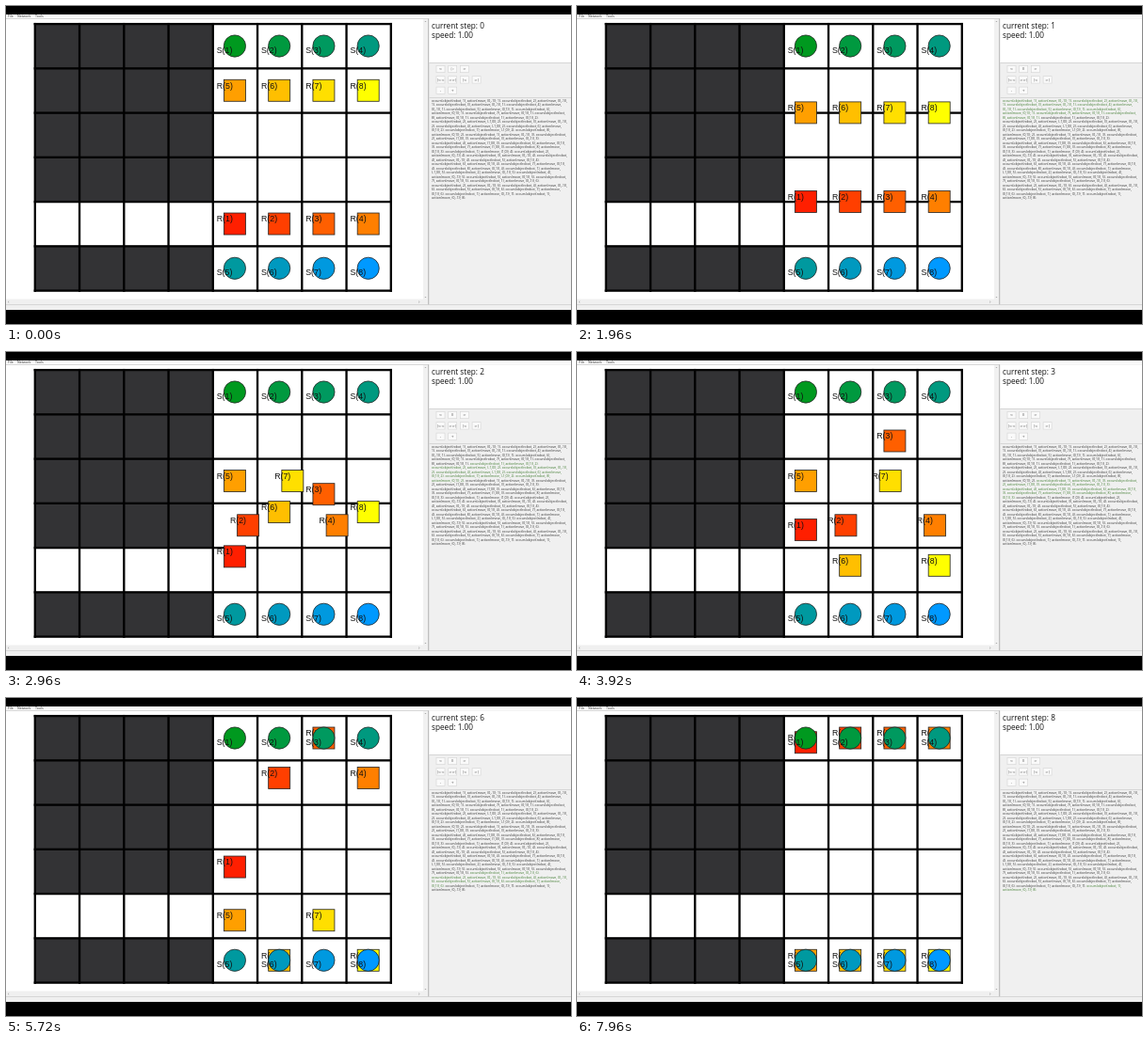
These frames come from a looping animation (600 by 338 pixels, 8 s). An HTML page with a canvas:

```html
<!DOCTYPE html>
<html lang="en">
<head>
<meta charset="utf-8">
<title>Grid robots</title>
<style>
  html, body { margin: 0; width: 100%; height: 100%; overflow: hidden; background: #000; }
  canvas { display: block; width: 600px; height: 338px; }
</style>
</head>
<body>
<canvas id="stage"></canvas>
<script>
const LOOP = 8000, PLAY_AT = 750, MOVE_AT = 1565, STEP_MS = 811, TICKS = 20;
const CELL = 47.25, LEFT = 30.8, TOP = 19.1, LINE = 2.3;
const UI = '"Open Sans", sans-serif';
const ZOOM = 10; // text is set large and scaled down, so small sizes keep exact advances
const DIRS = { U: [0, -1], D: [0, 1], L: [-1, 0], R: [1, 0], '.': [0, 0] };

// Start column and row, then one letter per step.
const robots = [
  [4, 4, 'UDURLUUU'], [5, 4, 'ULRUUU'], [6, 4, 'UUUU'], [7, 4, 'ULRUUU'],
  [4, 1, 'D..DDD'], [5, 1, 'DDDD'], [6, 1, 'DLRDDD'], [7, 1, 'DDDD']
].map(([col, row, moves], i) => ({ col, row, moves, id: i + 1 }));

const canvas = document.getElementById('stage');
const ctx = canvas.getContext('2d');
const ratio = window.devicePixelRatio || 1;
canvas.width = 600 * ratio;
canvas.height = 338 * ratio;
ctx.scale(ratio, ratio);

function rect(x, y, w, h, fill, stroke, line = 1) {
  ctx.fillStyle = fill;
  ctx.fillRect(x, y, w, h);
  if (stroke) {
    ctx.strokeStyle = stroke;
    ctx.lineWidth = line;
    ctx.strokeRect(x, y, w, h);
  }
}

function text(str, x, y, size, color = '#000', family = UI) {
  ctx.save();
  ctx.translate(x, y);
  ctx.scale(1 / ZOOM, 1 / ZOOM);
  ctx.font = `${size * ZOOM}px ${family}`;
  ctx.fillStyle = color;
  ctx.fillText(str, 0, 0);
  ctx.restore();
}

const label = (str, x, y) => text(str, x, y, 8.8, '#111', '"Liberation Sans", sans-serif');
const center = (col, row) => [LEFT + (col + 0.5) * CELL - 0.5, TOP + (row + 0.5) * CELL - 0.2];

// The plan as wrapped words, each tagged with its step.
function layoutPlan() {
  const size = 3.45, left = 452, right = 597.5, words = [];
  let x = left, y = 101.5;
  ctx.font = `${size * ZOOM}px ${UI}`;
  const measure = str => ctx.measureText(str).width / ZOOM;
  for (let step = 1; step <= 8; step++) {
    for (const { id, moves } of robots) {
      const move = moves[step - 1];
      if (!move || move === '.') continue;
      const fact = `occurs(object(robot, ${id}), action(move, (${DIRS[move]})), ${step}).`;
      for (const str of fact.split(' ')) {
        const width = measure(str);
        if (x + width > right) { x = left; y += 4.5; }
        words.push({ str, x, y, step, size });
        x += width + measure(' ');
      }
    }
  }
  return words;
}
const plan = layoutPlan();

function drawButtons(playing) {
  const rows = [['<', playing ? 'II' : '▷', '>'], ['|<<', '>>|', '|<', '>|'], ['-', '+']];
  ctx.textAlign = 'center';
  rows.forEach((row, r) => row.forEach((icon, c) => {
    const x = 461.5 + c * 12.7, y = 67 + r * 11.4;
    rect(x - 4.5, y - 3.7, 9, 7.4, '#fafafa', '#d4d4d4', 0.6);
    text(icon, x, y + 1.4, 4, '#666', '"DejaVu Sans", sans-serif');
  }));
  ctx.textAlign = 'left';
}

function drawWindow(step, playing) {
  rect(0, 0, 600, 338, '#000');
  rect(0, 9, 600, 314, '#f0f0f0');
  rect(0, 9, 600, 4.5, '#fafafa');
  [['File', 2], ['Network', 12], ['Tools', 31]].forEach(([s, x]) => text(s, x, 12, 3.6, '#333'));
  rect(0, 13.5, 449, 0.8, '#bbb');
  rect(0, 14, 443, 297.5, '#fff');
  rect(443, 14, 5, 297.5, '#f1f1f1');
  rect(448.3, 13.5, 0.9, 304, '#aaa');
  rect(0, 317, 600, 0.7, '#ccc');
  text('‹', 2, 316, 5, '#777');
  text('›', 438, 316, 5, '#777');
  text('ˆ', 444, 20, 5, '#777');
  text('ˇ', 444, 313, 5, '#777');

  rect(449.5, 14, 150.5, 46, '#fff');
  rect(449.5, 60, 150.5, 0.7, '#ccc');
  rect(449.5, 97, 150.5, 0.7, '#ccc');
  text(`current step: ${step}`, 452, 23.5, 8.25, '#111');
  text('speed: 1.00', 452, 34, 8.25, '#111');
  drawButtons(playing);
  for (const w of plan) text(w.str, w.x, w.y, w.size, w.step === step ? '#3c7a2c' : '#333');
}

function drawGrid() {
  for (let row = 0; row < 6; row++) {
    for (let col = 0; col < 8; col++) {
      const dark = col < 4 && row !== 4;
      rect(LEFT + col * CELL, TOP + row * CELL, CELL, CELL, dark ? '#333335' : '#fff');
    }
  }
  const half = LINE / 2;
  ctx.fillStyle = '#000';
  for (let c = 0; c <= 8; c++) ctx.fillRect(LEFT + c * CELL - half, TOP - half, LINE, 6 * CELL + LINE);
  for (let r = 0; r <= 6; r++) ctx.fillRect(LEFT - half, TOP + r * CELL - half, 8 * CELL + LINE, LINE);
}

function drawRobot({ col, row, moves, id }, progress) {
  [...moves].forEach((move, i) => {
    const part = Math.min(1, Math.max(0, progress - i));
    col += DIRS[move][0] * part;
    row += DIRS[move][1] * part;
  });
  const [x, y] = center(col, row);
  rect(x - 11.5, y - 11.5, 23, 23, `rgb(255, ${32 * id - 1}, 0)`, '#222', 0.8);
  label(`R(${id})`, x - 19.2, y - 2.2);
}

function drawStation(id) {
  const [x, y] = center(4 + (id - 1) % 4, id > 4 ? 5 : 0);
  ctx.beginPath();
  ctx.arc(x, y, 11.6, 0, Math.PI * 2);
  ctx.fillStyle = `rgb(0, 153, ${32 * id - 1})`;
  ctx.fill();
  ctx.strokeStyle = '#222';
  ctx.lineWidth = 0.8;
  ctx.stroke();
  label(`S(${id})`, x - 19.2, y + 7.4);
}

function draw() {
  const t = performance.now() % LOOP;
  const ticks = Math.max(0, Math.round((t - MOVE_AT) / STEP_MS * TICKS));
  const progress = ticks / TICKS;
  drawWindow(Math.ceil(progress), t >= PLAY_AT);
  drawGrid();
  robots.forEach(robot => drawRobot(robot, progress));
  for (let id = 1; id <= 8; id++) drawStation(id);
  requestAnimationFrame(draw);
}
draw();
</script>
</body>
</html>
```
